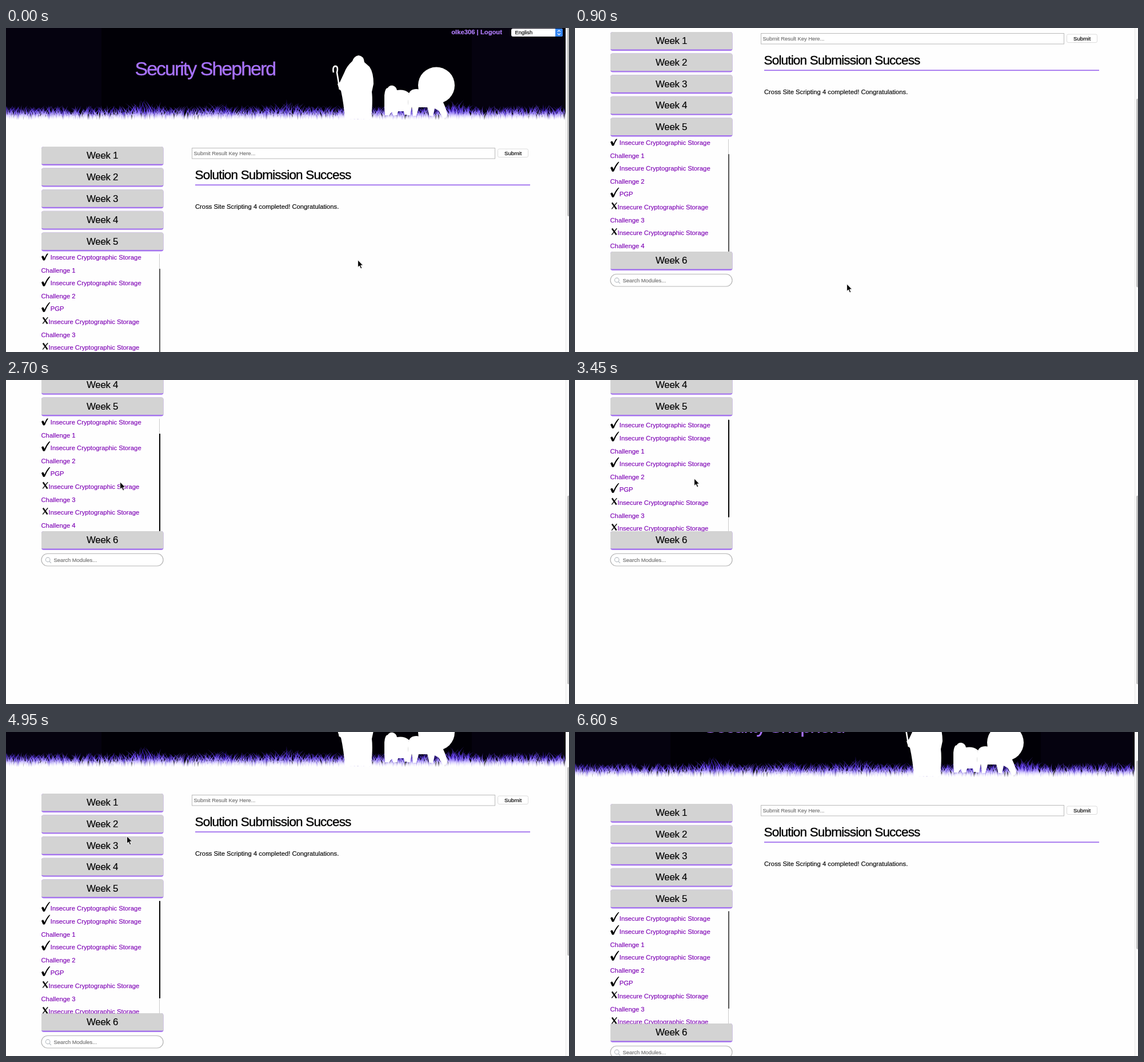
Recreate the animation shown at these times as an HTML page. Size 985 by 568 pixels, loop 7500 ms.

```html
<!DOCTYPE html>
<html lang="en">
<head>
<meta charset="utf-8">
<title>Security Shepherd</title>
<style>
  html, body { margin: 0; width: 100%; height: 100%; overflow: hidden; background: #fefefe; }
  svg { display: block; font-family: "Liberation Sans", Arial, sans-serif; font-size: 11.25px; color: #000; }
  text { fill: currentColor; stroke: currentColor; stroke-width: .15px; }
  .small { font-size: 9.4px; }
  .hint { color: #707070; }
  .week { font-size: 16.9px; letter-spacing: -.35px; text-anchor: middle; }
  .large { stroke-width: .35px; }
  #list text { color: #7d00b4; }
</style>
</head>
<body>
<svg width="985" height="568" viewBox="0 0 985 568">
  <defs>
    <linearGradient id="backGrass" gradientUnits="userSpaceOnUse" x1="0" y1="120" x2="0" y2="160">
      <stop offset="0" stop-color="#24127a"/><stop offset=".6" stop-color="#3d1fb4"/><stop offset="1" stop-color="#9a84f4"/>
    </linearGradient>
    <linearGradient id="frontGrass" gradientUnits="userSpaceOnUse" x1="0" y1="122" x2="0" y2="160">
      <stop offset="0" stop-color="#4324b8"/><stop offset=".55" stop-color="#6a48ea"/>
      <stop offset=".8" stop-color="#c3b4ff"/><stop offset="1" stop-color="#fff"/>
    </linearGradient>
    <linearGradient id="mist" x1="0" y1="0" x2="0" y2="1">
      <stop offset="0" stop-color="#fefefe" stop-opacity="0"/><stop offset="1" stop-color="#fefefe"/>
    </linearGradient>
    <clipPath id="listBox"><rect x="60" y="395.5" width="216" height="198"/></clipPath>
  </defs>

  <g id="page">
    <rect width="979" height="161" fill="#05020f"/>
    <rect x="167" width="648" height="161" fill="#010006"/>
    <path id="back" fill="url(#backGrass)"/>
    <path id="front" fill="url(#frontGrass)"/>
    <rect y="150" width="979" height="11.500" fill="url(#mist)"/>
    <g fill="#fff">
      <circle cx="753" cy="100.5" r="32"/>
      <path d="M617 48Q609 49 606 58Q596 67 592 78L584 95L580 98L583 107L586 110Q591 132 593 160L599 164L603 159H627L633 163L639 158Q642 128 640 112L643 98Q643 78 636 68L627 60Q626 49 617 48Z"/>
      <path d="M584 108L579 78Q582 66 575 67Q571 69 573 78" fill="none" stroke="#fff" stroke-width="2.6"/>
      <path d="M662 118Q663 105 668 105Q671 100 677 101Q683 103 684 109Q697 107 705 114L703 136L704 152H697L696 146H686L684 153H677L675 147L670 153H663L662 140Z"/>
      <path d="M704 118Q706 107 718 107L735 109Q750 109 760 122Q767 132 772 150Q772 159 765 158L757 145L750 141L747 154H741L737 139H722L718 154H712L710 138L707 153H702Z"/>
    </g>
    <text class="large" x="225.500" y="83" color="#a973ff" font-size="34" letter-spacing="-2">Security Shepherd</text>
    <text x="868" y="11" color="#b580ff" font-weight="bold" text-anchor="end">olke306 | Logout</text>
    <rect x="884" y="1" width="90" height="14" rx="3" fill="#fff"/>
    <path d="M961 1h10q3 0 3 3v8q0 3-3 3h-10z" fill="#3787f3"/>
    <path d="M965 6.500l2.500-2.500 2.500 2.500M965 9.500l2.500 2.500 2.500-2.500" fill="none" stroke="#fff" stroke-width="1.200"/>
    <text class="small" x="890.500" y="11.300">English</text>

    <rect x="325.500" y="210.500" width="530" height="18.500" fill="#fff" stroke="#bababa"/>
    <text class="small hint" x="328.500" y="223">Submit Result Key Here...</text>
    <rect x="860.500" y="212" width="53" height="14.500" rx="2.500" fill="#fff" stroke="#dcdcdc"/>
    <text x="887" y="222.500" font-size="9.700" text-anchor="middle">Submit</text>
    <text class="large" x="330.500" y="265" font-size="22.500" letter-spacing="-.82">Solution Submission Success</text>
    <rect x="331" y="274.300" width="586" height="1.800" fill="#a06fee"/>
    <text x="331" y="316.500">Cross Site Scripting 4 completed! Congratulations.</text>

    <g id="weeks"></g>
    <g clip-path="url(#listBox)">
      <g id="list"></g>
      <rect x="268" y="396" width="1" height="198" fill="#ccc"/>
      <rect id="listThumb" x="268" width="2" height="171" rx=".8"/>
    </g>
    <rect x="62" y="632.500" width="213" height="21.500" rx="10.700" fill="#fff" stroke="#b5b5b5" stroke-width="1.200"/>
    <path d="M77 643a3.800 3.800 0 1 0-7.600 0a3.800 3.800 0 1 0 7.600 0M76 646l3 3" fill="none" stroke="#b9bfc4" stroke-width="1.200"/>
    <text class="small hint" x="83.500" y="646.500">Search Modules...</text>
  </g>

  <rect x="979" width="6" height="568" fill="#fafafa"/>
  <rect x="979" width="1" height="568" fill="#e7e7e7"/>
  <rect id="pageThumb" x="982" width="6" height="330.500" rx="2" fill="#c1c1c1"/>
  <path id="cursor" d="M-.4-1.200V11.500L2.500 8.900L4.600 13.800L6.800 12.900L4.700 8.100H8.600Z" stroke="#fff" stroke-width=".9"/>
</svg>
<script>
const $ = id => document.getElementById(id);

// Grass: seeded blades, taller around a few clumps
let seed = 7;
const rand = () => (seed = (seed * 16807) % 2147483647) / 2147483647;
const clumps = [[245, 17], [375, 8], [487, 14], [783, 13], [945, 5]];
function grass(count, width) {
  let d = '';
  for (let i = 0; i < count; i++) {
    const x = rand() * 979;
    const tall = clumps.reduce((sum, [cx, h]) => sum + h * Math.exp(-(((x - cx) / 22) ** 2)), 0);
    const h = 12 + rand() * 14 + rand() ** 2 * tall;
    const tip = Math.min(978, Math.max(1, x + (rand() - .5) * h * 1.3));
    const f = n => n.toFixed(1);
    d += `M${f(x - width)} 161Q${f(x - width / 2)} ${f(161 - h * .6)} ${f(tip)} ${f(161 - h)}` +
         `Q${f(x + width)} ${f(161 - h * .6)} ${f(x + width)} 161Z`;
  }
  return d;
}
$('back').setAttribute('d', grass(650, 1.4));
$('front').setAttribute('d', grass(850, .9));

// Menu
const weekTops = [208, 245.6, 283.2, 320.8, 358.4, 593];
$('weeks').innerHTML = weekTops.map((y, i) =>
  `<rect x="62" y="${y}" width="213.500" height="33" rx="4" fill="#a574ee"/>
   <path d="M62 ${y + 30}V${y + 4}q0-4 4-4h205.500q4 0 4 4V${y + 30}q-2 .6-4 .6h-205.500q-2 0-4-.6Z" fill="#d3d3d3"/>
   <text class="week" x="168.500" y="${y + 21.3}">Week ${i + 1}</text>`).join('');

const tick = '<path d="M0-1Q3-4.500 4.200-1L5.500 1.500Q9-7 14-11.500L15.300-11.200Q9-3 6.200 4.800Q4 6.500 2.500 4.800Z"/>';
const cross = '<path d="M2.800-7.600L10.500 3.500" stroke="#111" stroke-width="2.600"/>' +
              '<path d="M11.200-7.800L2.200 3.500" stroke="#111" stroke-width="1.500"/>';
const storage = 'Insecure Cryptographic Storage';
const lines = [
  [tick, storage], [tick, storage], ['', 'Challenge 1'], [tick, storage], ['', 'Challenge 2'],
  [tick, 'PGP'], [cross, storage], ['', 'Challenge 3'], [cross, storage], ['', 'Challenge 4']];
$('list').innerHTML = lines.map(([mark, label], i) => {
  const x = mark === tick ? 15.8 : mark ? 12.5 : -.5;
  return `<g transform="translate(62 ${409.3 + i * 22.6})">${mark}<text x="${x}" y="4">${label}</text></g>`;
}).join('');

// Keyframes: [time, ...values], linear in between
const scrollKeys = [[0, 0], [150, 8], [300, 23], [600, 23], [750, 110], [900, 201], [1050, 225], [1500, 230],
  [1650, 230], [1800, 279], [1950, 310], [2100, 328], [4650, 328], [4800, 145], [4950, 100], [5100, 85], [5250, 82]];
const listKeys = [[2700, 30], [3300, 5], [3450, 2], [3750, 2], [3900, 0]];
const cursorKeys = [[600, 616, 408], [900, 476, 450], [1500, 215, 310], [1650, 215, 310], [1800, 196, 297],
  [2700, 200, 180], [3450, 209, 174], [3750, 209, 174], [4650, 212, 184], [5250, 212, 184],
  [5850, 285, 233], [6450, 768, 520]];

function sample(keys, t) {
  const next = keys.findIndex(k => k[0] > t);
  if (next === 0) return keys[0].slice(1);
  if (next < 0) return keys[keys.length - 1].slice(1);
  const a = keys[next - 1], b = keys[next], p = (t - a[0]) / (b[0] - a[0]);
  return a.slice(1).map((v, i) => v + (b[i + 1] - v) * p);
}

const STEP = 150, LOOP = 7500;
const move = (id, x, y) => $(id).setAttribute('transform', `translate(${x} ${y})`);

function draw(now) {
  const t = Math.floor((now % LOOP) / STEP) * STEP;
  const [scroll] = sample(scrollKeys, t).map(Math.round);
  const [listScroll] = sample(listKeys, t).map(Math.round);
  move('page', 0, -scroll);
  move('list', 0, -listScroll);
  move('listThumb', 0, 396 + listScroll * 26 / 30);
  move('pageThumb', 0, scroll * .62 - .6);
  move('cursor', ...sample(cursorKeys, t).map(Math.round));
  $('listThumb').setAttribute('fill', t >= 2100 && t < 6000 ? '#000' : '#555');
  $('cursor').style.display = t < 6600 ? '' : 'none';
  requestAnimationFrame(draw);
}
requestAnimationFrame(draw);
</script>
</body>
</html>
```
